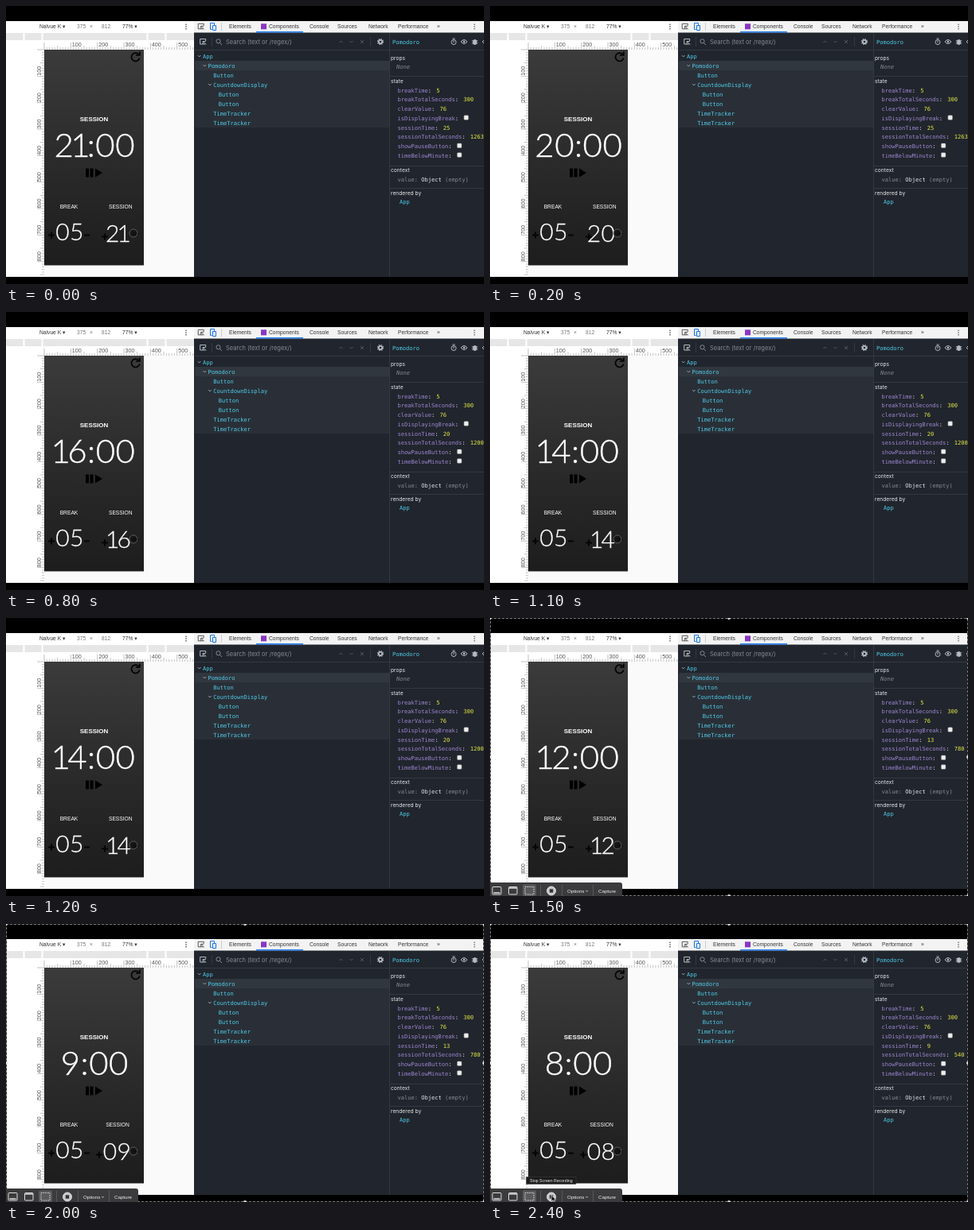
An HTML page for the animation above (2500 ms loop, 600x350 px).

```html
<!DOCTYPE html>
<html lang="en">
<head>
<meta charset="utf-8">
<title>Pomodoro timer</title>
<style>
  html, body { margin: 0; width: 100%; height: 100%; overflow: hidden; background: #000; }
  svg { display: block; width: 600px; height: 350px; }
  text { font: 6.7px "Liberation Sans", sans-serif; white-space: pre; }
  .ui { font: 6.7px Inter, sans-serif; fill: #e6e7ea; }
  .search { font-size: 7.5px; fill: #858c98; }
  .code { font: 7.07px "DejaVu Sans Mono", monospace; fill: #4fcbe8; }
  .key { fill: #9d87d2; }
  .punct { fill: #e6e7ea; }
  .value { fill: #e6ec48; }
  .muted { fill: #838994; }
  .italic { font-style: italic; }
  .app { fill: #fff; text-anchor: middle; }
  .title { font-size: 8px; font-weight: bold; }
  .digits { font-family: Lato, sans-serif; font-weight: 300; fill: #fff; stroke: #fff; stroke-width: .45; }
  .big { font-size: 42px; letter-spacing: .5px; text-anchor: middle; }
  .small { font-size: 30px; letter-spacing: .5px; text-anchor: end; stroke-width: .3; }
  .ruler { font-size: 7.2px; fill: #555; }
  .bar { font-size: 6.2px; fill: #eee; }
  .tip { font-size: 5.2px; fill: #eee; }
  .line { fill: none; }
</style>
</head>
<body>
<svg viewBox="0 0 600 350">
  <defs>
    <linearGradient id="shade" x2="0" y2="1">
      <stop stop-color="#3b3b3c"/>
      <stop offset=".5" stop-color="#2b2b2c"/>
      <stop offset="1" stop-color="#1d1d1e"/>
    </linearGradient>
    <path id="plus" d="M-4 0H4M0-4V4" stroke="#050505" stroke-width="2"/>
    <path id="minus" d="M-3.5 0H3.5" stroke="#050505" stroke-width="2"/>
    <path id="inspect" class="line" d="M3 3H-3.5V-3.5H3.5V-1M0-0.5L4 3.5M0 3V-.5H3.5"/>
    <g id="dots"><circle cy="-2.8" r=".8"/><circle r=".8"/><circle cy="2.8" r=".8"/></g>
  </defs>

  <!-- device preview -->
  <rect y="19" width="236" height="322" fill="#fafafb"/>
  <rect y="19" width="236" height="15" fill="#fff"/>
  <rect y="34" width="236" height="9" fill="#e6e6e7"/>
  <path d="M22.5 34V43M45.5 34V43M177.5 34V43M200.5 34V43" stroke="#fff" stroke-width="2"/>
  <rect y="43" width="236" height="12" fill="#fff"/>
  <rect y="43" width="48" height="298" fill="#fff"/>
  <g fill="#333">
    <text x="42" y="28.4">Nalvue K ▾</text>
    <text x="89" y="28.4" fill="#777">375</text>
    <text x="105" y="28.4" fill="#777">×</text>
    <text x="120" y="28.4" fill="#777">812</text>
    <text x="146" y="28.4">77% ▾</text>
    <use href="#dots" x="226" y="26"/>
  </g>
  <g id="rulers"></g>

  <!-- phone app -->
  <rect x="48" y="55" width="125" height="271.5" fill="url(#shade)"/>
  <path class="line" d="M166.5 60.8A5.2 5.2 0 1 0 167.7 65.5M167.8 57.5V62H163" stroke="#000" stroke-width="1.7"/>
  <text class="app title" x="110.5" y="145">SESSION</text>
  <text id="clock" class="digits big" y="190"></text>
  <path d="M100 204.5h4v11h-4zM105.5 204.5h4v11h-4zM112 204.5l9 5.5l-9 5.5z" fill="#000"/>
  <text class="app" x="79" y="255.4">BREAK</text>
  <text id="label" class="app" y="255.4">SESSION</text>
  <use href="#plus" x="57" y="288.5"/>
  <text class="digits small" x="98" y="295.2">05</text>
  <use href="#minus" x="101.5" y="288.5"/>
  <use id="more" href="#plus" y="290.5"/>
  <text id="minutes" class="digits small" y="297"></text>
  <use href="#minus" x="163" y="286.5"/>
  <circle cx="160" cy="286" r="5" fill="#111" fill-opacity=".75" stroke="#626262" stroke-width=".9"/>

  <!-- developer tools -->
  <rect x="236" y="19" width="364" height="322" fill="#21252d"/>
  <rect x="236" y="19" width="364" height="14.5" fill="#f3f3f4"/>
  <use href="#inspect" x="244.7" y="25.8" stroke="#555"/>
  <path class="line" d="M256.5 21.5h5v3M256.5 21.5v8h2M259.5 24.5h4v6h-4z" stroke="#1a73e8"/>
  <path d="M270.5 21V31" stroke="#ccc"/>
  <rect x="314" y="32" width="59" height="1.5" fill="#1a73e8"/>
  <rect x="320" y="22.3" width="7" height="7" fill="#8a35c4"/>
  <g id="tabs" fill="#333"></g>
  <use href="#dots" x="588" y="26" fill="#555"/>

  <rect x="237" y="69" width="244" height="84" fill="#2a2f37"/>
  <rect x="237" y="69" width="244" height="12" fill="#31373f"/>
  <path d="M237 55.5H600M481.5 34V341M258.5 39V51M457.5 39V51M482 88.5H600M482 201.5H600M482 229.5H600" stroke="#343942"/>
  <g class="line" stroke="#b4b9c2">
    <use href="#inspect" x="247.2" y="45"/>
    <path d="M268.5 46.5l2.5 2.5" stroke="#858c98"/>
    <circle cx="266.5" cy="44.3" r="2.6" stroke="#858c98"/>
    <path d="M418.5 46l2-2l2 2M431.5 44l2 2l2-2M445 43l4 4M449 43l-4 4" stroke="#525963"/>
    <circle cx="470" cy="45" r="2.2" stroke-width="1.8"/>
    <circle cx="470" cy="45" r="3.5" stroke-width="1.2" stroke-dasharray="1.4 1.35"/>
    <circle cx="562" cy="45.5" r="3"/>
    <path d="M560.5 41H563.5M562 43.5V46"/>
    <path d="M571 45Q575 40 579 45Q575 50 571 45z"/>
    <circle cx="575" cy="45" r="1" fill="#b4b9c2"/>
    <rect x="586.5" y="42.5" width="4" height="6" rx="2" fill="#b4b9c2"/>
    <path d="M584.8 43.5h2M584.8 45.5h2M584.8 47.5h2M590.2 43.5h2M590.2 45.5h2M590.2 47.5h2" stroke-width=".8"/>
    <path d="M600 43l-2 2l2 2"/>
  </g>
  <text class="ui search" x="276" y="47.6">Search (text or /regex/)</text>
  <g id="tree"></g>
  <text class="code" x="485" y="47.6">Pomodoro</text>
  <text class="ui" x="483" y="68.2">props</text>
  <text class="code muted italic" x="490" y="79.4">None</text>
  <text class="ui" x="483" y="97">state</text>
  <g id="state"></g>
  <text class="ui" x="483" y="209.4">context</text>
  <text class="code muted" x="491.5" y="220.6">value: <tspan class="punct">Object</tspan> (empty)</text>
  <text class="ui" x="483" y="238.2">rendered by</text>
  <text class="code" x="494" y="248.6">App</text>

  <!-- screen recorder -->
  <g id="recorder">
    <rect class="line" x=".5" y=".5" width="599" height="349" stroke="#222"/>
    <rect class="line" x=".5" y=".5" width="599" height="349" stroke="#999" stroke-dasharray="2 3"/>
    <g id="handles" fill="#ddd"></g>
    <path d="M0 333H163Q166 333 166 336V350H0z" fill="#3b3b3d"/>
    <rect x="41" y="335.5" width="17" height="14.5" rx="2" fill="#5a5a5c"/>
    <g class="line" stroke="#ddd">
      <rect x="3" y="338.5" width="11" height="9.5" rx="1"/>
      <path d="M4.5 346H12.5" stroke-width="1.5"/>
      <rect x="23.5" y="338.5" width="10.5" height="9.5" rx="1"/>
      <path d="M23.5 340H34" stroke-width="1.5"/>
      <rect x="44" y="338.5" width="11" height="9.5" stroke-dasharray="1.5 1.2"/>
      <circle cx="77" cy="343.5" r="5.5" fill="#c9c9ca"/>
      <path d="M63.5 336V350M90.5 336V350M129.5 336V350" stroke="#58585a"/>
      <path d="M120 343l1.5 1.5l1.5-1.5" stroke-width=".8"/>
    </g>
    <rect x="74.8" y="341.3" width="4.4" height="4.4" fill="#333"/>
    <text class="bar" x="97" y="345.6">Options</text>
    <text class="bar" x="136" y="345.6">Capture</text>
  </g>
  <g id="hover">
    <rect x="45.5" y="318.5" width="62.5" height="9" fill="#1b1b1c" stroke="#444" stroke-width=".5"/>
    <text class="tip" x="50" y="325">Stop Screen Recording</text>
    <path d="M77 341.5v8l1.9-1.8l1.3 2.6l1.3-.7l-1.2-2.4h2.5z" fill="#111" stroke="#fff" stroke-width=".6"/>
  </g>
</svg>

<script>
const LOOP = 2500;
const CHAR = 4.256;
const $ = id => document.getElementById(id);
const text = (x, y, content, attrs = '') => `<text x="${x}" y="${y}" ${attrs}>${content}</text>`;

// Rulers: one tick per 10 px of a page drawn at a third of its size
const unit = 10 / 3;
let ticks = '', marks = '';
for (let i = 0; i <= 85; i++) {
  const size = i % 10 === 0 ? 9 : i % 5 === 0 ? 5 : 3;
  const x = 48 + i * unit, y = 55 + i * unit;
  if (x < 236) ticks += `M${x} 55v${-size}`;
  ticks += `M48 ${y}h${-size}`;
  if (i && i % 10 === 0) {
    if (x < 230) marks += text(x + 1.5, 51, i * 10, 'class="ruler"');
    marks += text(0, 0, i * 10, `class="ruler" transform="translate(44 ${y - .5}) rotate(-90)"`);
  }
}
$('rulers').innerHTML = `<path d="${ticks}" stroke="#999" stroke-width=".6"/>${marks}`;

$('tabs').innerHTML = [
  [280, 'Elements'], [330, 'Components'], [381, 'Console'], [416, 'Sources'],
  [455, 'Network'], [492, 'Performance'], [541, '»']
].map(([x, name]) => text(x, 28, name)).join('');

const tree = [
  [0, 'App', 1], [1, 'Pomodoro', 1], [2, 'Button'], [2, 'CountdownDisplay', 1],
  [3, 'Button'], [3, 'Button'], [2, 'TimeTracker'], [2, 'TimeTracker']
];
$('tree').innerHTML = tree.map(([depth, name, open], row) => {
  const x = 247 + depth * 6.6, y = 63 + row * 12;
  const arrow = open ? `<path class="line" d="M${x - 6} ${y - .8}l1.7 1.7l1.7-1.7" stroke="#b4b9c2" stroke-width=".9"/>` : '';
  return arrow + text(x, y + 2.6, name, 'class="code"');
}).join('');

const fields = [
  ['breakTime', 5], ['breakTotalSeconds', 300], ['clearValue', 76], ['isDisplayingBreak'],
  ['sessionTime', ''], ['sessionTotalSeconds', ''], ['showPauseButton'], ['timeBelowMinute']
];
$('state').innerHTML = fields.map(([key, value], row) => {
  const y = 106 + row * 11.75, end = 491.5 + (key.length + 1) * CHAR + 6.2;
  const name = text(491.5, y + 2.6, `${key}<tspan class="punct">:</tspan>`, 'class="code key"');
  return name + (value === undefined
    ? `<rect x="${end + .6}" y="${y - 3.5}" width="5.5" height="5.5" rx="1" fill="#eee" stroke="#999" stroke-width=".5"/>`
    : text(end, y + 2.6, value, `class="code value" id="${key}"`));
}).join('');

$('handles').innerHTML = [0, 300, 600].flatMap(x => [0, 175, 350].map(y =>
  x === 300 && y === 175 ? '' : `<circle cx="${x}" cy="${y}" r="2"/>`)).join('');

// The figure 1 is set tighter than the others
function setDigits(node, x, string, tuck) {
  node.textContent = string;
  node.setAttribute('x', x);
  node.setAttribute('dx', [...string].map((c, i) =>
    i === 0 ? 0 : -tuck * ((c === '1') + (string[i - 1] === '1'))).join(' '));
}

const STEP = 100, FIRST_CLICK = 117, CLICK_GAP = 163, CLICKS = 13;
const RECORDER_AT = 1400, HOVER_AT = 2300;
const updates = [[0, 25, 1263], [300, 20, 1200], [1400, 13, 780], [2100, 9, 540]];
let shown = -1;

function draw() {
  const t = Math.floor(performance.now() % LOOP / STEP) * STEP;
  if (t !== shown) {
    shown = t;
    const clicks = Math.floor((t - FIRST_CLICK) / CLICK_GAP) + 1;
    const minutes = 21 - Math.max(0, Math.min(CLICKS, clicks));
    const [, session, seconds] = updates.filter(([at]) => t >= at).pop();
    const teens = minutes > 9;
    const leadingOne = teens && minutes < 20;
    setDigits($('clock'), leadingOne ? 109.5 : 111.3, `${minutes}:00`, 4.3);
    setDigits($('minutes'), 157.5, String(minutes).padStart(2, '0'), 3.2);
    $('label').setAttribute('x', teens ? 143.8 : 140);
    $('more').setAttribute('x', teens ? 124 : 117);
    $('sessionTime').textContent = session;
    $('sessionTotalSeconds').textContent = seconds;
    $('recorder').style.display = t >= RECORDER_AT ? '' : 'none';
    $('hover').style.display = t >= HOVER_AT ? '' : 'none';
  }
  requestAnimationFrame(draw);
}
draw();
</script>
</body>
</html>
```
